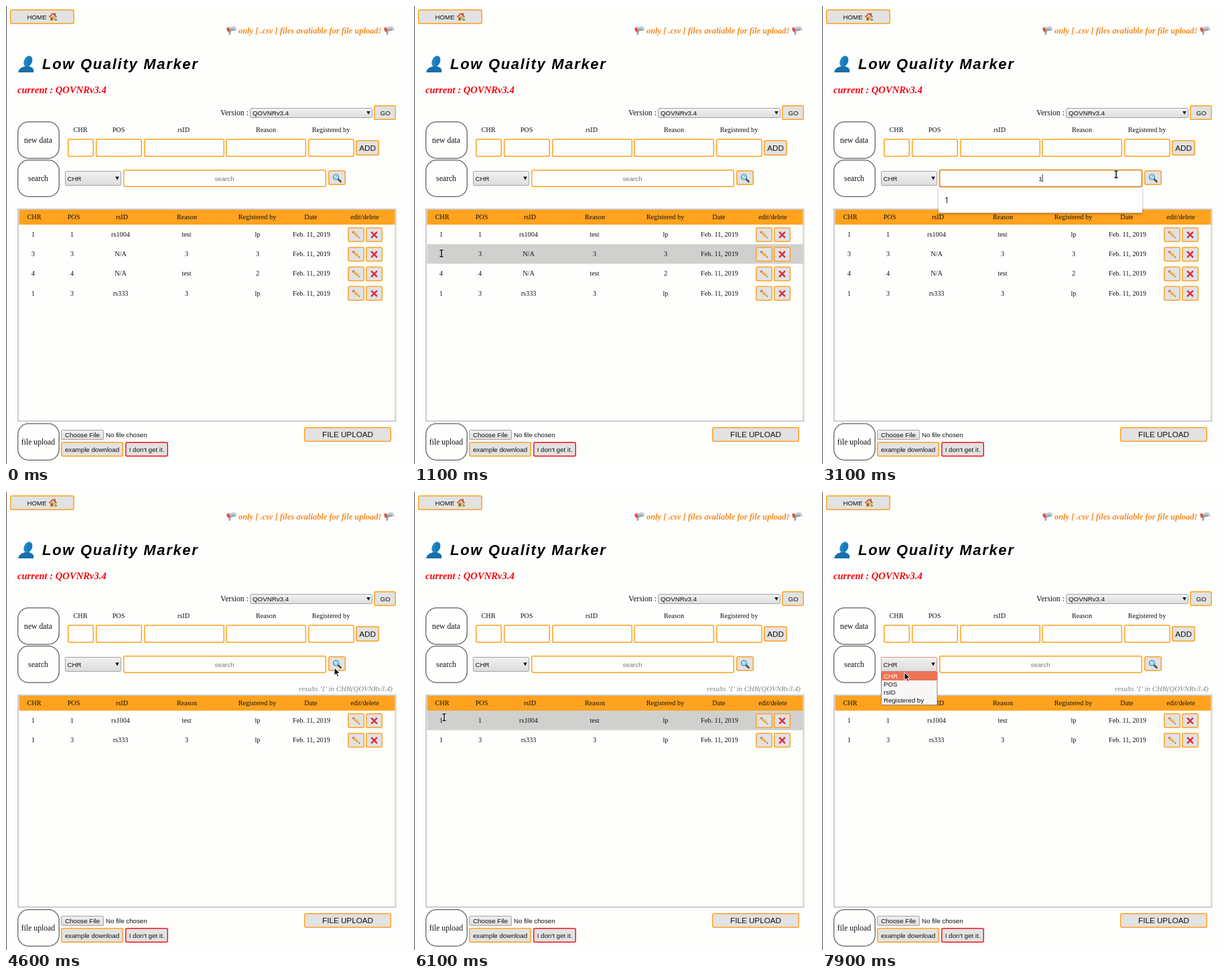
Animation of 600x683 px, one loop 8 s. Source, as an HTML page with a canvas:

```html
<!DOCTYPE html>
<html lang="en">
<head>
<meta charset="utf-8">
<title>Low Quality Marker</title>
<style>
html, body { margin: 0; width: 100%; height: 100%; overflow: hidden; background: #fefefd; }
canvas { display: block; width: 600px; height: 683px; }
</style>
</head>
<body>
<canvas id="stage" width="600" height="683"></canvas>
<script>
const ctx = document.getElementById('stage').getContext('2d');
const LOOP = 8000, STEP = 100;
const SERIF = '"Liberation Serif", "Times New Roman", serif';
const SANS = '"Liberation Sans", Arial, sans-serif';
const UI = '9.74px ' + SANS, LABEL = '11.7px ' + SERIF, CELL = '10.23px ' + SERIF;
const ORANGE = '#ffa21e', PAPER = '#fefefd', BUTTON = '#e2e2e2';
const VERSION = 'QOVNRv3.4';
const ROW_TOP = 326, ROW_H = 29.2;
const COLS = [40.5, 98.5, 171, 269.5, 375.5, 456];
const ROWS = [
  ['1', '1', 'rs1004', 'test', 'lp'],
  ['3', '3', 'N/A', '3', '3'],
  ['4', '4', 'N/A', 'test', '2'],
  ['1', '3', 'rs333', '3', 'lp']
];
// Times of the interface events
const ENTER = 300, FOCUS = 1800, SUGGEST = 2000, TYPE = 2500, BACK = 3100,
  CLICK = 4200, RELOAD = 4500, OPEN = 7700;
// Pointer path: time, x, y
const PATH = [
  [300, 470, 294], [500, 330, 345], [750, 130, 444], [900, 60, 428], [1100, 41, 369],
  [1300, 70, 378], [1600, 300, 330], [1900, 463, 264], [3000, 463, 264],
  [3100, 439, 251], [3300, 206, 258], [3600, 588, 254], [3900, 497, 258], [4100, 490, 262],
  [5200, 490, 262], [5500, 400, 378], [5800, 170, 372], [6100, 45, 336],
  [6400, 14, 346], [6700, 52, 372], [7000, 46, 350],
  [7400, 108, 268], [7600, 116, 257], [7800, 116, 257], [7900, 123, 269]
];

function text(s, x, y, font = CELL, color = '#111', align = 'center', spacing = 0) {
  ctx.font = font;
  ctx.fillStyle = color;
  ctx.textAlign = align;
  ctx.letterSpacing = spacing + 'px';
  ctx.fillText(s, x, y);
}

function box(x1, y1, x2, y2, { fill = PAPER, edge = ORANGE, line = 1.5, r = 2.2 } = {}) {
  const h = line / 2;
  ctx.beginPath();
  ctx.roundRect(x1 + h, y1 + h, x2 - x1 - line, y2 - y1 - line, r);
  ctx.fillStyle = fill;
  ctx.fill();
  ctx.lineWidth = line;
  ctx.strokeStyle = edge;
  ctx.stroke();
}

function rect(x1, y1, x2, y2, color) {
  ctx.fillStyle = color;
  ctx.fillRect(x1, y1, x2 - x1, y2 - y1);
}

function poly(points, color, edge) {
  ctx.beginPath();
  points.forEach(([x, y]) => ctx.lineTo(x, y));
  ctx.closePath();
  ctx.fillStyle = color;
  ctx.fill();
  if (edge) {
    ctx.strokeStyle = edge;
    ctx.lineWidth = 1;
    ctx.stroke();
  }
}

function oval(x, y, rx, ry, color, turn = 0) {
  ctx.beginPath();
  ctx.ellipse(x, y, rx, ry, turn, 0, 7);
  ctx.fillStyle = color;
  ctx.fill();
}

function stroke(x1, y1, x2, y2, color, width, cap = 'butt') {
  ctx.beginPath();
  ctx.moveTo(x1, y1);
  ctx.lineTo(x2, y2);
  ctx.lineCap = cap;
  ctx.lineWidth = width;
  ctx.strokeStyle = color;
  ctx.stroke();
}

function at(x, y, draw) {
  ctx.save();
  ctx.translate(x, y);
  draw();
  ctx.restore();
}

const button = (x1, y1, x2, y2, edge) => box(x1, y1, x2, y2, { fill: BUTTON, edge });
const pill = y => box(17, y, 80, y + 56, { edge: '#777', r: 16 });

function native(x1, y1, x2, y2, edge = '#a3a3a3') {
  const fill = ctx.createLinearGradient(0, y1, 0, y2);
  fill.addColorStop(0, '#f2f2f2');
  fill.addColorStop(1, '#dcdcdc');
  box(x1, y1, x2, y2, { fill, edge, line: 1, r: 1 });
}

const arrowDown = (x, y) => poly([[x - 2.8, y - 2.4], [x + 2.8, y - 2.4], [x, y + 2.6]], '#111');

function house() {
  rect(-4.5, -1, 4.5, 5.5, '#e5b768');
  rect(2, -5.5, 4, -1, '#9b5a3c');
  poly([[-6.3, 0], [0, -6], [6.3, 0], [5, 1], [0, -3.5], [-5, 1]], '#d4512f');
  rect(-3, 1, -.5, 5.5, '#8d4b33');
  rect(1, 1, 3.4, 3.3, '#86c5e0');
  oval(4.6, 4.4, 1.6, 1.4, '#6b9d3a');
}

function megaphone() {
  poly([[-4, 1], [-1.5, 1.5], [-2.2, 6.2], [-4.4, 6.2]], '#8c979c');
  poly([[-6, -4.5], [5, -6.5], [8, -1], [-4.5, 2]], '#c3cbd0');
  poly([[-5, -2], [6.5, -3], [8, -1], [-4.5, 2]], '#99a5ab');
  oval(6, -3.6, 1.5, 3.4, '#dce1e4', -.4);
  oval(-5.4, -1.4, 2, 3.5, '#e0483f', -.2);
}

function bust() {
  ctx.transform(1, 0, -.2, 1, 0, 0);
  ctx.beginPath();
  ctx.moveTo(-11.5, 12);
  ctx.bezierCurveTo(-11.5, 4, -5, 4.5, -3, 2.5);
  ctx.lineTo(3, 2.5);
  ctx.bezierCurveTo(5, 4.5, 11.5, 4, 11.5, 12);
  ctx.closePath();
  ctx.fillStyle = '#176fae';
  ctx.fill();
  oval(0, -4.5, 6.3, 8.2, '#2186c9');
  oval(2, -5, 4, 6.5, '#1b79b9');
}

function lens() {
  stroke(1.5, 1.5, 5.5, 5.5, '#3e4d57', 2.6, 'round');
  oval(-1.5, -1.5, 4.6, 4.6, '#4b87aa');
  oval(-1.5, -1.5, 3.4, 3.4, '#9fdcf5');
  oval(-2.5, -2.6, 1.2, 1, '#dff5fd');
}

function pencil() {
  stroke(-5, -4.5, -3.4, -3, '#e0606a', 3.4);
  stroke(-3.6, -3.2, -2.5, -2.2, '#a5b4bb', 3.4);
  stroke(-2.5, -2.2, 3, 2.7, '#f3a72e', 3.4);
  stroke(-2.2, -2.7, 3.5, 2.3, '#fbc75b', 1);
  poly([[4.2, 1.4], [1.9, 4], [5.6, 5]], '#e7c39a');
  poly([[5.1, 3.4], [3.9, 4.5], [5.8, 5.2]], '#333');
}

function cross() {
  stroke(-4.4, -4.4, 4.4, 4.4, '#d92f45', 2.5);
  stroke(4.4, -4.4, -4.4, 4.4, '#d92f45', 2.5);
}

function drawHead() {
  button(6, 5, 102, 27);
  text('HOME', 31.5, 20, UI, '#111', 'left');
  at(70, 16, house);
  at(337, 36.5, megaphone);
  at(572, 36.5, megaphone);
  text('only [ .csv ] files avaliable for file upload!', 347, 41,
    'italic bold 12.42px ' + SERIF, '#f58a20', 'left');
  at(32, 87, bust);
  text('Low Quality Marker', 54, 94, 'italic bold 22px ' + SANS, '#000', 'left', 1.7);
  text('current : ' + VERSION, 17, 130, 'italic bold 14.62px ' + SERIF, '#f5050f', 'left');
  text('Version :', 320, 163, LABEL, '#111', 'left');
  native(364, 152, 547, 167);
  text(VERSION, 368, 163, UI, '#111', 'left');
  arrowDown(541, 159.5);
  button(549, 148, 582, 170);
  text('GO', 566, 163, UI);
}

function drawEntry() {
  pill(172);
  text('new data', 48, 204, LABEL);
  const fields = [['CHR', 92, 131, 111], ['POS', 134, 203, 168], ['rsID', 206, 326, 265],
    ['Reason', 328, 448, 388], ['Registered by', 451, 520, 485]];
  for (const [name, x1, x2, mid] of fields) {
    text(name, mid, 188);
    box(x1, 198, x2, 225);
  }
  button(522, 200, 557, 223);
  text('ADD', 539.5, 215.5, '11.7px ' + SANS);
}

function drawSearch(t) {
  const focused = t >= FOCUS && t < CLICK;
  const typed = t >= TYPE && t < RELOAD;
  pill(229);
  text('search', 48, 261, LABEL);
  native(88, 246, 172, 268, t >= OPEN ? '#e0907c' : undefined);
  text('CHR', 91.5, 261, UI, '#111', 'left');
  arrowDown(166, 257);
  if (focused) box(174.4, 243.4, 478.6, 270.6, { edge: '#e59738', line: 2.2 });
  else box(175, 244, 478, 270);
  if (typed) text('1', 326, 261, UI);
  else text('search', 326, 261, UI, '#777');
  if (focused && typed) rect(328.6, 251, 329.5, 263, '#111');
  button(481, 245, 507, 267);
  at(494, 256.5, lens);
}

function drawTable(t, hover) {
  const found = t >= RELOAD;
  const rows = found ? ROWS.filter(r => r[0] === '1') : ROWS;
  if (found) {
    text(`results '1' in CHR(${VERSION})`, 577, 296.5, 'italic 10.96px ' + SERIF, '#858585', 'right');
  }
  box(17, 302, 582.5, 620, { edge: '#cdcdcd', line: 2, r: 0 });
  rect(19.5, 304, 580.5, 326, ORANGE);
  const heads = [['CHR', 42], ['POS', 101], ['rsID', 173], ['Reason', 270],
    ['Registered by', 375], ['Date', 455], ['edit/delete', 535.5]];
  heads.forEach(([name, x]) => text(name, x, 318));
  rows.forEach((row, i) => {
    const y = ROW_TOP + i * ROW_H;
    if (i === hover) rect(19.5, y, 580.5, y + ROW_H, '#d0d0cf');
    [...row, 'Feb. 11, 2019'].forEach((s, c) => text(s, COLS[c], y + 18));
    button(510, y + 4, 535, y + 26);
    button(537, y + 4, 562, y + 26);
    at(522.5, y + 15, pencil);
    at(549.5, y + 15.2, cross);
  });
}

function drawFoot() {
  pill(622);
  text('file upload', 48, 654, LABEL);
  native(82, 632, 146, 647);
  text('Choose File', 114, 643, UI);
  text('No file chosen', 149, 643, UI, '#111', 'left');
  button(82, 650, 175, 672);
  text('example download', 128.5, 665, UI);
  button(178, 650, 242, 672, '#ee1620');
  text("I don't get it.", 210, 665, UI);
  button(445, 628, 575, 650);
  text('FILE UPLOAD', 510, 643, '11.7px ' + SANS);
}

function drawSuggest() {
  ctx.save();
  ctx.shadowColor = 'rgba(0,0,0,.35)';
  ctx.shadowBlur = 3;
  ctx.shadowOffsetY = 1;
  rect(174, 271, 478, 308.5, '#fff');
  ctx.restore();
  text('1', 186.3, 294, '12px "Open Sans", "Noto Sans", sans-serif');
}

function drawMenu() {
  box(88, 267.5, 172.5, 318, { fill: '#f8f7f6', edge: '#8c8580', line: 1, r: 0 });
  rect(88.5, 268, 172, 281, '#ee7355');
  ['CHR', 'POS', 'rsID', 'Registered by'].forEach((s, i) =>
    text(s, 92, 277.7 + i * 12.1, UI, i ? '#111' : '#fff', 'left'));
}

function pointer(t) {
  if (t < ENTER || (t >= TYPE && t < BACK)) return null;
  const n = PATH.findIndex(p => p[0] > t);
  if (n < 0) return PATH[PATH.length - 1].slice(1);
  const [t0, x0, y0] = PATH[n - 1], [t1, x1, y1] = PATH[n];
  const u = (t - t0) / (t1 - t0), k = u * u * (3 - 2 * u);
  return [x0 + (x1 - x0) * k, y0 + (y1 - y0) * k];
}

function hoverRow(pos, t) {
  if (!pos || pos[0] < 19 || pos[0] > 581) return -1;
  const i = Math.floor((pos[1] - ROW_TOP) / ROW_H);
  return i >= 0 && i < (t < RELOAD ? 4 : 2) ? i : -1;
}

function drawPointer([x, y], hover) {
  const inField = x > 175 && x < 478 && y > 244 && y < 270;
  const mid = ROW_TOP + (hover + .5) * ROW_H;
  const onText = hover >= 0 && Math.abs(y - mid) < 7 && COLS.some(c => Math.abs(c - x) < 26);
  if (inField || onText) {
    for (const [color, w] of [['#fff', 3.2], ['#111', 1.5]]) {
      stroke(x, y - 5, x, y + 5, color, w);
      stroke(x - 2.6, y - 5, x + 2.6, y - 5, color, w);
      stroke(x - 2.6, y + 5, x + 2.6, y + 5, color, w);
    }
  } else {
    const shape = [[0, 0], [0, 11.5], [2.7, 9.2], [4.6, 13.6], [6.6, 12.7], [4.7, 8.5], [8.2, 8.2]];
    poly(shape.map(([a, b]) => [x + a, y + b]), '#111', '#fff');
  }
}

function draw(t) {
  const pos = pointer(t), hover = hoverRow(pos, t);
  rect(0, 0, 600, 683, PAPER);
  rect(0, 0, 1, 683, '#55524f');
  drawHead();
  drawEntry();
  drawSearch(t);
  drawTable(t, hover);
  drawFoot();
  if (t >= SUGGEST && t < CLICK) drawSuggest();
  if (t >= OPEN) drawMenu();
  if (pos) drawPointer(pos, hover);
}

const start = performance.now();
function tick(now) {
  const t = Math.max(0, now - start) % LOOP;
  draw(Math.floor(t / STEP) * STEP);
  requestAnimationFrame(tick);
}
draw(0);
requestAnimationFrame(tick);
</script>
</body>
</html>
```
